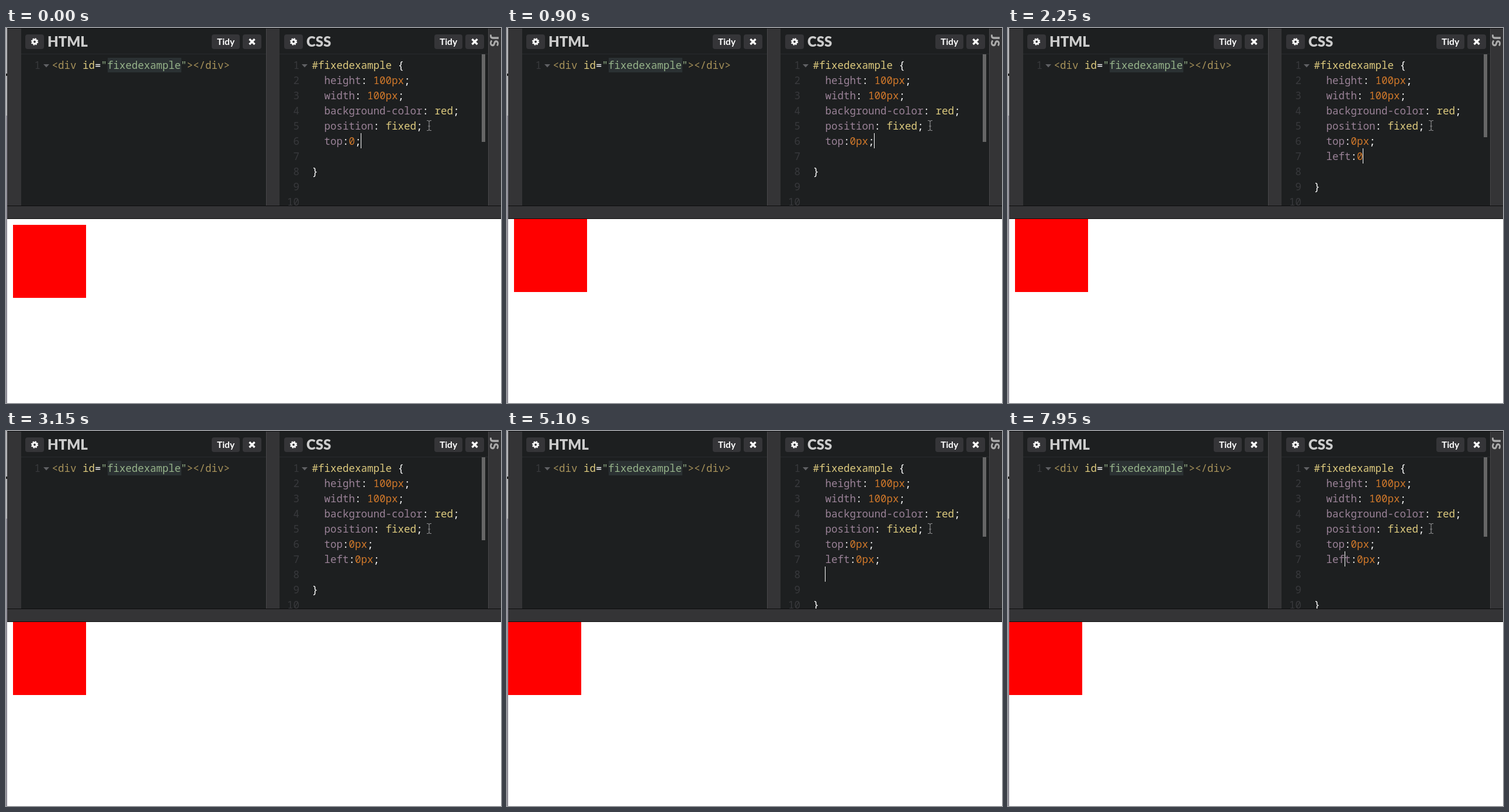
Animation of 847 by 642 pixels, one loop 8000 ms. Source, as an HTML page:

```html
<!DOCTYPE html>
<html lang="en">
<head>
<meta charset="utf-8">
<title>Fixed position demo</title>
<style>
  html, body { margin: 0; width: 100%; height: 100%; overflow: hidden; background: #fff; }
  svg { display: block; width: 847px; height: 642px; }
  text { white-space: pre; }
  .code { font: 17.5px "Noto Sans Mono", monospace; }
  .title { font: 900 24px Lato, sans-serif; fill: #ccc; }
  .label { font: bold 15.5px Lato, sans-serif; fill: #fff; }
  .num { fill: #38393c; text-anchor: end; }
  .tag { fill: #a7925a; }
  .key { fill: #ddca7e; }
  .str { fill: #96b38a; }
  .prop { fill: #9a8297; }
  .val { fill: #d0782a; }
  .op { fill: #fff; }
  .bar { fill: #343436; }
  .button { fill: #353538; }
</style>
</head>
<body>
<svg viewBox="0 0 847 642">
  <defs>
    <clipPath id="editor"><rect x="2" y="45" width="845" height="259"/></clipPath>
    <g id="gear">
      <rect class="button" width="32" height="25" rx="4"/>
      <circle cx="16" cy="12.5" r="3.4" fill="none" stroke="#fff" stroke-width="3"/>
      <circle cx="16" cy="12.5" r="5.1" fill="none" stroke="#fff" stroke-width="2.2" stroke-dasharray="2.2 1.806"/>
    </g>
    <g id="close">
      <rect class="button" width="32" height="25" rx="4"/>
      <path d="M11.5 8l9 9m0-9l-9 9" stroke="#fff" stroke-width="3.4"/>
    </g>
    <g id="tidy">
      <rect class="button" width="48" height="25" rx="4"/>
      <text class="label" x="24" y="17.5" text-anchor="middle">Tidy</text>
    </g>
    <path id="fold" d="M0 0h10l-5 5.5z" fill="#606164"/>
  </defs>

  <rect width="847" height="642" fill="#fff"/>
  <rect id="box" width="125" height="125" fill="#f00"/>

  <rect class="bar" width="847" height="327"/>
  <rect x="26" width="419" height="304" fill="#1d1f20"/>
  <rect x="468" width="357" height="304" fill="#1d1f20"/>
  <path d="M445.5 0V304M825.5 0V304" stroke="#47474a"/>
  <path d="M26 44.5H445M468 44.5H825" stroke="#292b2d"/>
  <path d="M2 .5H847M2 304.5H847M2 326.5H847" stroke="#0c0c0d"/>
  <rect width="2" height="150" fill="#b5b5b9"/>
  <rect y="150" width="2" height="492" fill="#8f8d97"/>
  <rect y="78" width="2" height="4" fill="#222"/>

  <use href="#gear" x="33" y="11"/>
  <text class="title" x="71" y="32">HTML</text>
  <use href="#tidy" x="352" y="11"/>
  <use href="#close" x="405" y="11"/>
  <use href="#gear" x="476" y="11"/>
  <text class="title" x="514" y="32">CSS</text>
  <use href="#tidy" x="733" y="11"/>
  <use href="#close" x="786" y="11"/>
  <text class="title" transform="translate(827.5 11) rotate(90)" style="font-size:21px;fill:#aaa">JS</text>

  <rect x="174" y="51" width="126" height="25" fill="#2b3133"/>
  <g class="code" clip-path="url(#editor)">
    <text class="num" x="59" y="70">1</text>
    <text id="markup" x="78.5" y="70"></text>
    <g id="numbers"></g>
    <g id="rules"></g>
  </g>
  <use href="#fold" x="64" y="62"/>
  <use href="#fold" x="506" y="62"/>
  <rect id="scroll" x="814" y="45" width="6" fill="#666"/>
  <rect id="caret" width="1" height="26" fill="#fff"/>
  <path d="M720 158.5h2.5l1.5 1.5 1.5-1.5h2.5M720 175.5h2.5l1.5-1.5 1.5 1.5h2.5M724 160v14M722 168h4" fill="none" stroke="#8a8a8c" stroke-width="1.2"/>
</svg>
<script>
const LOOP = 8000, LINE = 26, CHAR = 10.5, INDENT = 544.5;
const $ = id => document.getElementById(id);
const lineTop = row => 50 + LINE * (row - 1);

function svg(tag, attrs, parent, text = "") {
  const el = document.createElementNS("http://www.w3.org/2000/svg", tag);
  for (const name in attrs) el.setAttribute(name, attrs[name]);
  el.textContent = text;
  return parent.appendChild(el);
}

function spans(parent, parts) {
  for (const [kind, text] of parts) svg("tspan", { class: kind }, parent, text);
}

// Colours one "name: value;" declaration.
function declaration(row, source) {
  const [, name, colon, value, end] = source.match(/^([\w-]*)(:? ?)([^;]*)(;?)$/);
  const text = svg("text", { x: INDENT, y: lineTop(row) + 20 }, $("rules"));
  const kind = /^\d/.test(value) ? "val" : "key";
  spans(text, [["prop", name], ["op", colon], [kind, value], ["op", end]]);
  return text;
}

spans($("markup"), [["tag", "<div "], ["key", "id"], ["op", "="], ["str", '"fixedexample"'], ["tag", "></div>"]]);
for (let n = 1; n <= 10; n++) svg("text", { class: "num", x: 502, y: lineTop(n) + 20 }, $("numbers"), n);
spans(svg("text", { x: 523.5, y: 70 }, $("rules")), [["key", "#fixedexample "], ["op", "{"]]);
["height: 100px;", "width: 100px;", "background-color: red;", "position: fixed;"]
  .forEach((rule, i) => declaration(i + 2, rule));
const brace = svg("text", { class: "op", x: 523.5 }, $("rules"), "}");

// Each step changes part of the state; caret is [row, column] or null.
const typeTop = top => ({ top, caret: [6, top.length] });
const typeLeft = left => ({ left, caret: [7, left.length] });
const caretAt = (row, col) => ({ caret: [row, col] });
const hide = { caret: null };
const steps = [
  [0, { ...typeTop("top:0;"), left: "", end: 8, x: 12, y: 337 }],
  [450, { ...typeTop("top:0"), y: 327 }],
  [750, typeTop("top:0p")],
  [900, typeTop("top:0px;")],
  [1200, { ...caretAt(7, 0), end: 9 }],
  [1500, typeLeft("le")],
  [1650, typeLeft("lef")],
  [1800, typeLeft("left")],
  [1950, typeLeft("left:")],
  [2250, typeLeft("left:0")],
  [2400, typeLeft("left:0px")],
  [2550, typeLeft("left:0px;")],
  [3150, hide],
  [3450, { x: 2 }],
  [3600, caretAt(7, 9)],
  [3900, { ...caretAt(8, 0), end: 10 }],
  [4500, hide],
  [5100, caretAt(8, 0)],
  [5550, hide],
  [5700, caretAt(7, 0)],
  [6150, caretAt(8, 0)],
  [6750, caretAt(7, 0)],
  [7200, hide],
  [7650, caretAt(7, 1)],
  [7800, caretAt(7, 2)],
  [7950, caretAt(7, 3)]
];
const scrollEnd = { 8: 195, 9: 187, 10: 181 };
let edited = [], shown = -1;

function render(time) {
  const past = steps.filter(([start]) => start <= time);
  if (past.length === shown) return;
  shown = past.length;
  const { top, left, caret, end, x, y } = Object.assign({}, ...past.map(step => step[1]));

  edited.forEach(el => el.remove());
  edited = [declaration(6, top), declaration(7, left)];
  brace.setAttribute("y", lineTop(end) + 20);
  $("scroll").setAttribute("height", scrollEnd[end] - 45);
  $("box").setAttribute("x", x);
  $("box").setAttribute("y", y);
  $("caret").style.display = caret ? "" : "none";
  if (caret) {
    $("caret").setAttribute("x", Math.floor(INDENT + caret[1] * CHAR));
    $("caret").setAttribute("y", lineTop(caret[0]));
  }
}

const began = performance.now();
function tick() {
  render((performance.now() - began) % LOOP);
  requestAnimationFrame(tick);
}
tick();
</script>
</body>
</html>
```
